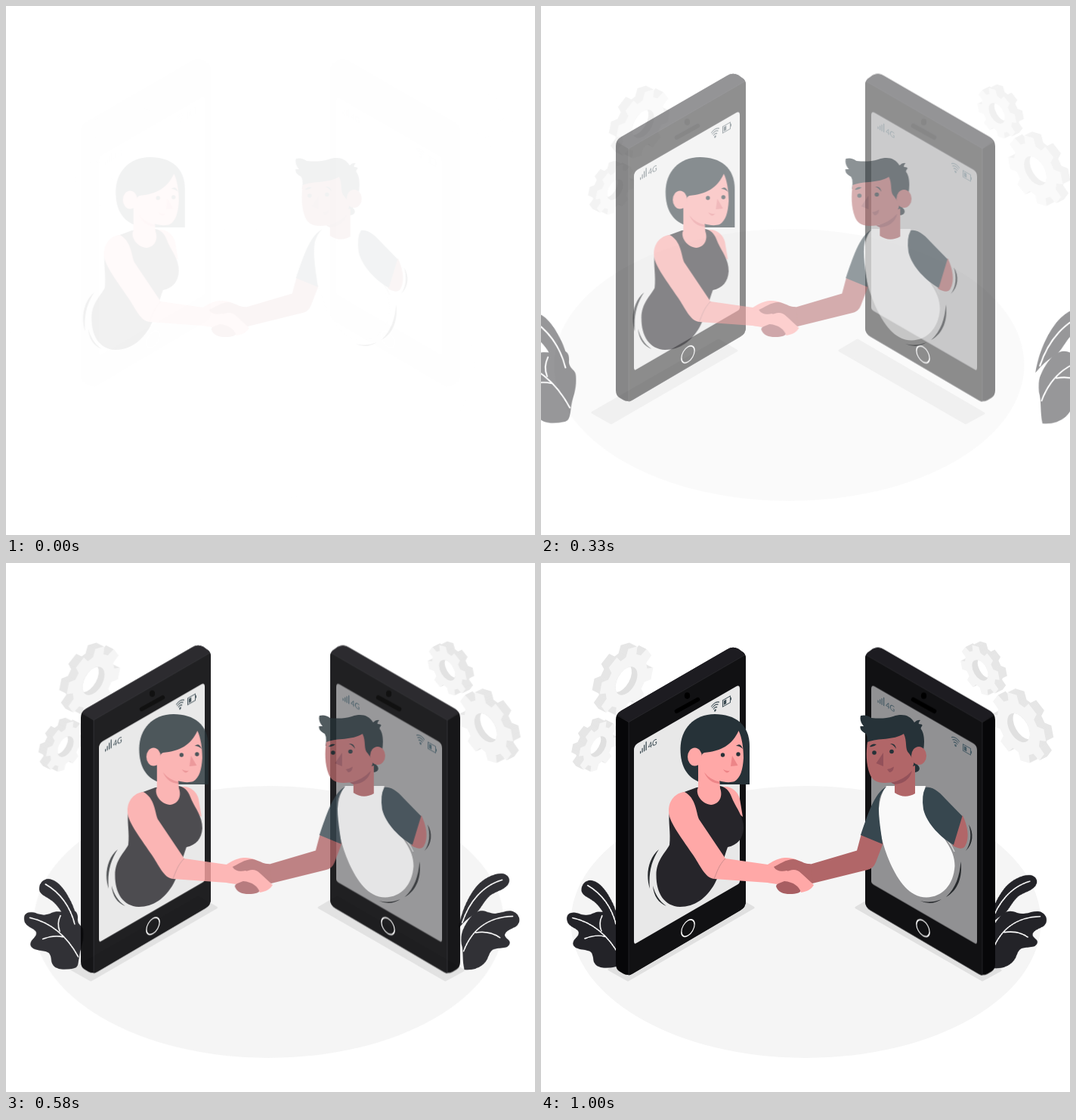
An HTML page for the animation above (1040 ms loop, 700 px wide and 700 px high).

```html
<!DOCTYPE html>
<html lang="en">
<head>
<meta charset="utf-8">
<title>Handshake between two phones</title>
<style>
  html, body { margin: 0; width: 100%; height: 100%; overflow: hidden; background: #fff; }
  svg { display: block; width: 100vw; height: 100vh; }

  /* One loop is 1040 ms; the entrance is already 38 ms in at the start and rests at 92.5%. */
  .floor, .gears, .plants, .phones, .people { animation: 1040ms infinite both; }
  .floor  { --from: translate(-41.8px, 0); animation-name: enter; }
  .gears  { --from: translate(41.8px, 0); animation-name: enter; }
  .phones { --from: translate(0, -41.8px); animation-name: enter; }
  .plants { transform-origin: 352px 475px; animation-name: shrink; }
  .people { animation-name: glide; }

  @keyframes enter {
    0% { opacity: .005; transform: var(--from); animation-timing-function: cubic-bezier(.345, .089, .499, 1.367); }
    92.5%, 100% { opacity: 1; transform: translate(0, 0); }
  }
  @keyframes shrink {
    0% { opacity: .005; transform: scale(1.367); animation-timing-function: cubic-bezier(.345, .089, .499, 1.367); }
    92.5%, 100% { opacity: 1; transform: scale(.913); }
  }
  @keyframes glide {
    0% { opacity: .063; transform: translate(-39.4px, 0); animation-timing-function: cubic-bezier(.141, .234, .63, 1); }
    92.5%, 100% { opacity: 1; transform: translate(0, 0); }
  }

  .leaf { fill: #232328; }
  .vein { fill: none; stroke: #fff; stroke-width: 1.7; stroke-linecap: round; }
  .icon { fill: currentColor; }
  .line { fill: none; stroke: currentColor; stroke-width: 1.1; }
  text { font: 500 10.5px Lato, "Open Sans", sans-serif; }
  .hair { fill: #263238; }
  .top { fill: #26252a; }
  .skin { fill: #ffa8a7; }
  .blush { fill: #ed8588; }
  .tan { fill: #b16668; }
  .shade { fill: #93515a; }
  .sleeve { fill: #37474f; }
  .swish { fill: #26292c; }
</style>
</head>
<body>
<svg viewBox="0 0 700 700">
  <defs>
    <g id="phone">
      <path fill="#070709" d="M99 207Q99 199 106 195L246 114Q253 109 261 113L265 116Q271 119 271 126V447Q271 455 264 459L121 543Q115 546 109 543L104 540Q99 537 99 530Z"/>
      <path fill="#111113" d="M116 210L270 121Q271 123 271 126V447Q271 455 264 459L121 543Q118 545 116 545Z"/>
      <path fill="#1d1c21" d="M101 200Q103 197 106 195L246 114Q253 109 261 113L265 116Q269 118 270 121L116 210Z"/>
      <path fill="none" stroke="#3a3a3e" stroke-width=".5" d="M101 201L116 210L270 121M116 210V545"/>
      <path fill="currentColor" d="M123 247Q123 241 128 238L258 163Q263 160 263 166V421Q263 423 260 425L127 502Q123 505 123 500Z"/>
      <path stroke="#000" stroke-width="5.5" stroke-linecap="round" d="M179.500 195.500L207.500 180"/>
      <ellipse cx="193.500" cy="175" rx="3.600" ry="4.300"/>
      <circle r="10" fill="none" stroke="#fff" stroke-width="1.500" transform="matrix(.866 -.5 0 1 194.500 482.500)"/>
    </g>
    <g id="signal">
      <path class="icon" d="M0 0V-3.200H1.400V0ZM2.900 0V-5.800H4.300V0ZM5.800 0V-8.600H7.200V0ZM8.700 0V-11.400H10.100V0Z"/>
      <text class="icon" x="12.500">4G</text>
    </g>
    <g id="power">
      <circle class="icon" cy="3.500" r="1.500"/>
      <path class="line" d="M-3 .8Q0 -2 3 .8M-4.600 -1.800Q0 -5.600 4.600 -1.800M-6.200 -4.300Q0 -9.200 6.200 -4.300"/>
      <path class="line" d="M11.500 -4H23V4.500H11.500ZM24.300 -1.500V2"/>
      <path class="icon" d="M13 -2.500H17V3H13Z"/>
    </g>
  </defs>

  <g class="floor">
    <ellipse cx="350.500" cy="475" rx="311" ry="180" fill="#f5f5f5"/>
    <g fill="#e0e0e0" stroke="#e0e0e0" stroke-width="3" stroke-linejoin="round">
      <path d="M90 538L115 552L281 456L257 442Z"/>
      <path d="M417 456L441 442L608 539L584 552Z"/>
    </g>
  </g>

  <g class="gears" id="gears"></g>

  <g class="plants">
    <path class="leaf" d="M25 429C25 419 33 413 41 415C51 417 61 429 68 443C75 456 78 468 79 480L64 476C58 462 52 453 44 446C35 439 26 437 25 429Z"/>
    <path class="leaf" d="M4 468C5 462 12 460 19 462C29 466 35 466 43 462C51 458 59 463 67 459C76 457 80 462 79 471C79 480 87 480 87 488C88 502 84 510 82 520C80 530 81 539 74 540C64 542 50 543 45 536C40 530 44 520 36 517C26 514 16 515 13 508C11 500 22 497 21 490C20 483 2 483 4 468Z"/>
    <path class="vein" d="M34 422C55 434 69 454 75 478M12 469C40 475 64 494 80 524M55 466C51 474 51 481 54 488M30 499C40 495 50 494 59 496"/>
    <path class="leaf" d="M614 484C617 463 627 439 640 424C650 413 665 406 675 407C684 408 688 416 683 423C676 431 666 432 658 438C650 445 645 457 638 463C629 468 621 475 614 484Z"/>
    <path class="leaf" d="M619 489C624 476 632 464 642 460C651 457 657 464 666 463C677 462 684 457 692 461C700 465 702 475 695 481C689 485 679 487 679 494C680 499 689 501 685 507C681 514 670 510 662 514C655 519 657 527 649 534C641 541 631 543 622 542C619 530 621 516 618 506Q617 495 619 489Z"/>
    <path class="vein" d="M619 476C629 446 648 424 675 416M621 516C632 487 654 468 690 467M638 490C650 488 662 490 672 497"/>
  </g>

  <g class="phones">
    <use href="#phone" y=".6" color="#e8e8e8"/>
    <use href="#phone" y=".6" color="#919193" transform="matrix(-1 0 0 1 700 0)"/>
    <g color="#37474f">
      <use href="#signal" transform="matrix(.866 -.5 0 1 131 252.500)"/>
      <use href="#power" transform="matrix(.866 -.5 0 1 230.500 191.500)"/>
    </g>
    <g color="#455a64">
      <use href="#signal" transform="matrix(.866 .5 0 1 445.500 184.500)"/>
      <use href="#power" transform="matrix(.866 .5 0 1 548.500 238)"/>
    </g>
  </g>

  <g class="people">
    <!-- woman -->
    <path class="swish" d="M156 379C142 391 138 412 144 431C142 411 146 394 156 379ZM148 427C149 441 156 450 166 454C156 447 151 438 148 427Z"/>
    <path class="hair" d="M276 293V242C276 214 257 200 230 200C202 200 184.500 220 184.500 246C184.500 270 194 284 210 290L236 293Z"/>
    <path class="skin" d="M236 297C250 293 260 301 263 312L267 336L250 322Z"/>
    <path class="top" d="M187 304L206 297L237 295C247 297 250 304 254 314C259 325 268 335 268 351C267 365 260 373 247 376C241 392 239 407 230 424C219 444 203 455 184 455C163 454 152.500 437 152.500 413C152.500 393 165 383 170 373C172 358 168 340 170 330Z"/>
    <path class="skin" d="M208 262V297C204 303 210 318 225 320C236 319 241 309 237 298L236 284Z"/>
    <path class="skin" d="M208 262L212 259Q212 252 216 251C238 249 253 241 261.500 222C266 231 268 245 268 258C267 274 264 284 256 289C247 292 233 289 224 282L208 272Z"/>
    <path class="blush" d="M216 277Q224 287 236 289.500V292Q222 291 216 277Z"/>
    <ellipse class="skin" cx="203.500" cy="256.500" rx="9.500" ry="12"/>
    <g class="hair">
      <circle cx="240.500" cy="254" r="2.700"/>
      <circle cx="261" cy="253" r="2.700"/>
      <path d="M258 242Q264 237 267 246Q263 242 258 242Z"/>
    </g>
    <path class="blush" d="M253 255L260.500 268L251 269ZM241 273Q246 276 250 274.500Q246 281 241 273Z"/>
    <path class="skin" d="M190 303C178 304 169 314 169 328C169 342 182 358 201 386C210 399 217 417 229 418L314 424L330 413L346 399C340 391 331 390 322 390C312 391 305 396 300 399L244 391L209 339C205 329 205 311 190 303Z"/>
    <path fill="none" stroke="#b88082" stroke-width=".7" d="M244 391C235 400 233 409 229 418"/>

    <!-- man -->
    <path class="swish" d="M566 346C573 357 572 372 562 381C569 371 570 359 566 346ZM555.500 395C558 415 552 433 536 442C549 430 554 414 555.500 395ZM502 447Q515 451 530 445Q516 454 502 447Z"/>
    <path class="hair" d="M423 202Q431 200 437 205C448 206 456 206 466 203C478 199 488 201 494 211Q498 207 502 208Q499 211 500 213Q506 213 504 216Q502 218 503 220C507 225 508 236 506 248L498 267C504 272 500 278 491 277L480 250L431 242Q433 231 430 226C425 223 422 221 422.500 216L427 216Q421 209 423 202Z"/>
    <path class="tan" d="M558 334C564 347 568 363 561 375Q557 381 545 374L540 350Z"/>
    <path class="tan" d="M424 358L418 380.500L357 398.500L338 396C328 395 315 399 309 402C308 407 317 408 325 407L359 424L432 406Q440 404 443 396L453 370Z"/>
    <path fill="#f9f9f9" d="M457 295H509C503 310 507 327 516 341C530 361 548 378 547.500 401C546 426 531 442 510 442.500C487 442 473 421 462 397C452 374 446 350 447 325Q449 305 457 295Z"/>
    <path fill="none" stroke="#d2d2d2" stroke-width="1.500" d="M510 335C522 352 540 364 547 382"/>
    <path class="sleeve" d="M509 297C519 295 528 304 538 315L557.500 335L546 373C530 364 511 346 506 326Q503 307 509 297ZM457 296C441 304 432 334 423 360L452 372C449 350 445 328 448 312Q451 302 457 296Z"/>
    <path class="tan" d="M468 278V304Q481 313 495 305V268Z"/>
    <path class="tan" d="M432 237C447 231 466 235 480 226C485 236 481 247 487 252L494 262C491 280 476 291 455 291C444 291 438 287 435 279C430 266 430 250 432 237Z"/>
    <path class="shade" d="M463 290.500Q479 288 491 275Q487 291 468 293Z"/>
    <ellipse class="tan" cx="500" cy="255" rx="10" ry="12"/>
    <g class="hair">
      <circle cx="441" cy="251" r="2.800"/>
      <circle cx="464" cy="249.500" r="2.800"/>
      <path d="M435 243Q438 238 444 240Q440 244 435 243ZM462 239Q469 238 470 246Q467 241 462 239Z"/>
    </g>
    <path class="shade" d="M453 251L453 269L443.500 265ZM458 273Q463 272 467 269.500Q466 277 461 277Z"/>

    <!-- clasped hands -->
    <path fill="#a85e62" d="M311 428C314 436 321 438 329 438C338 438 344 436 344 433L337 420L321 420Q312 423 311 428Z"/>
    <path class="skin" d="M300 402L310 404Q320 411 329 407Q338 404 345 411L361 426C358 432 351 435 344 436C342 428 334 422 322 421L312 425L300 423Z"/>
    <path class="tan" d="M308 402C315 399 324 392 334 392C343 393 349 399 357 398.500L360 424L344 410Q337 403 329 406Q313 411 308 402Z"/>
  </g>
</svg>

<script>
  const TEETH = 8, PHASE = 14, DEPTH = { x: -10, y: -5 };
  const polar = (r, deg) => {
    const a = deg * Math.PI / 180;
    return `${(r * Math.cos(a)).toFixed(1)} ${(r * Math.sin(a)).toFixed(1)}`;
  };

  function gearPath(r) {
    const points = [];
    for (let i = 0; i < TEETH; i++) {
      const mid = PHASE + i * 360 / TEETH;
      points.push(polar(r * .77, mid - 15), polar(r, mid - 10), polar(r, mid + 10), polar(r * .77, mid + 15));
    }
    return `M${points.join('L')}Z`;
  }

  // Overlap of the front and back rims, where one sees through the hole.
  function lensPath(r) {
    const u = DEPTH.x * .75 / .866, v = DEPTH.y * .75 + u / 2;
    const d = Math.hypot(u, v), h = Math.sqrt(r * r - d * d / 4) / d;
    const a = `${u / 2 - v * h} ${v / 2 + u * h}`, b = `${u / 2 + v * h} ${v / 2 - u * h}`;
    return `M${a}A${r} ${r} 0 0 1 ${b}A${r} ${r} 0 0 1 ${a}Z`;
  }

  function gear(x, y, r, flip) {
    const outline = gearPath(r), hole = r * .41, steps = 10;
    const layer = (k, fill) =>
      `<path d="${outline}" fill="${fill}" transform="matrix(.866 -.5 0 1 ${DEPTH.x * k} ${DEPTH.y * k})"/>`;
    let body = '';
    for (let i = steps; i > 0; i--) body += layer(i / steps, '#e6e6e6');
    return `<g transform="translate(${x} ${y}) scale(${flip} 1)">${body}${layer(0, '#f5f5f5')}
      <g transform="matrix(.866 -.5 0 1 0 0)"><circle r="${hole}" fill="#e0e0e0"/>
      <path d="${lensPath(hole)}" fill="#fff"/></g></g>`;
  }

  document.getElementById('gears').innerHTML =
    gear(113, 156, 41, 1) + gear(76, 243, 30, 1) + gear(581, 142, 30, -1) + gear(632, 218, 42, -1);
</script>
</body>
</html>
```
